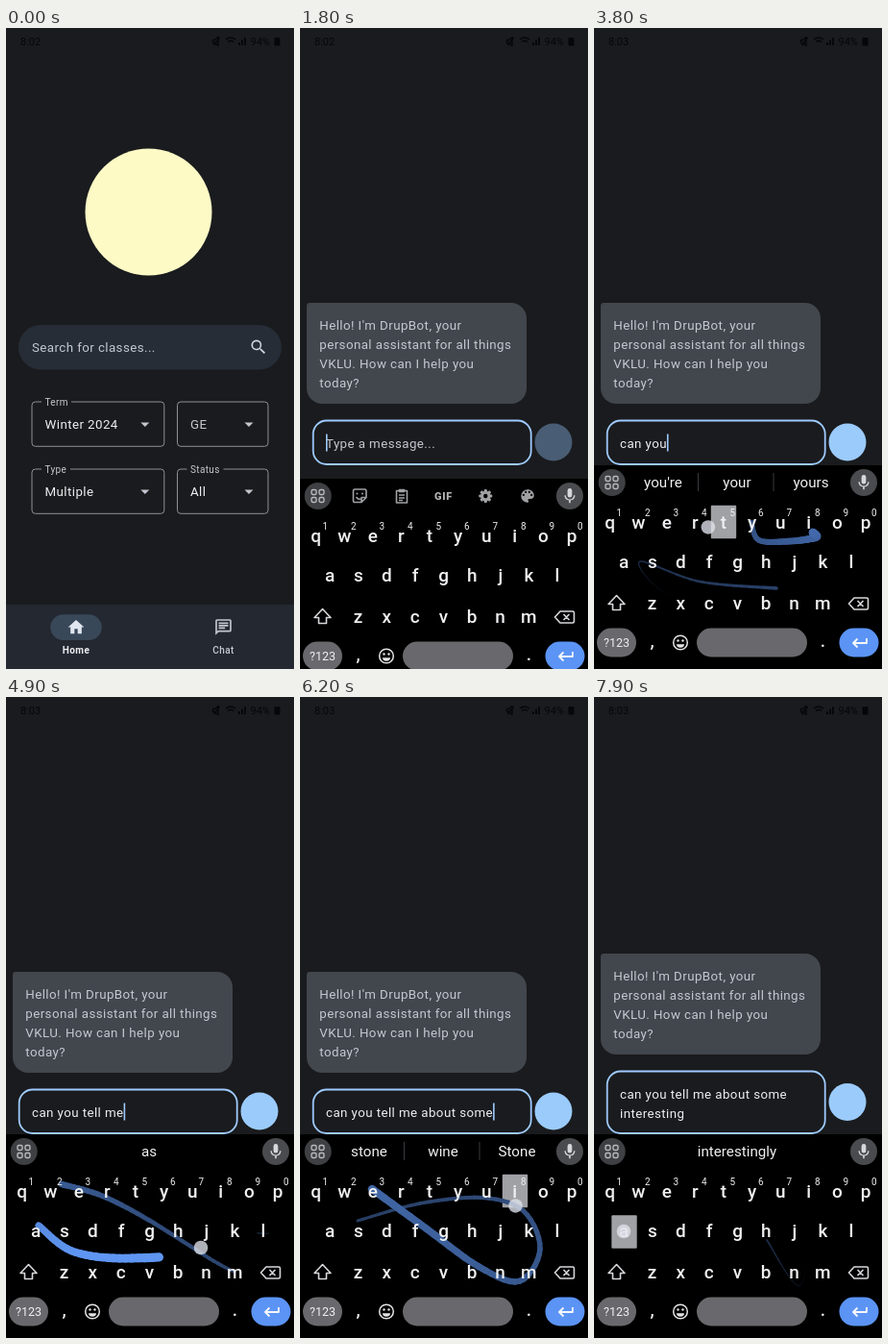
Write an HTML page that moves like this. It is 300 by 667 pixels and loops after 8000 ms.

```html
<!DOCTYPE html>
<html lang="en">
<head>
<meta charset="utf-8">
<title>Class search and chat</title>
<style>
  html, body { margin: 0; width: 100%; height: 100%; overflow: hidden; background: #1a1b1e; }
  svg { display: block; }
  text { font-family: Roboto, sans-serif; font-size: 13.33px; letter-spacing: .417px; fill: #c5c8d0; }
  .small { font-size: 10px; letter-spacing: .36px; }
  .strong { fill: #eeeef2; }
  .nav { font-size: 10px; font-weight: 500; text-anchor: middle; }
  .status text { font-size: 11px; letter-spacing: 0; fill: #060708; }
  .board text { fill: #f0f0f2; letter-spacing: 0; text-anchor: middle; }
  .board .key { font-size: 19px; font-weight: 500; }
  .board .digit { font-size: 10px; }
  .board .word { font-size: 15.2px; }
  .icon { fill-rule: evenodd; }
</style>
</head>
<body>
<svg id="stage" width="300" height="667" viewBox="0 0 300 667"></svg>
<script>
const LOOP = 8000, STEP = 100, TRAIL_LIFE = 850, TRAIL_LAG = 50;

const ICONS = {
  home: 'M10 20v-6h4v6h5v-8h3L12 3 2 12h3v8z',
  homeLine: 'M12 5.7l5 4.5V18h-2v-6H9v6H7v-7.8zM12 3L2 12h3v8h6v-6h2v6h6v-8h3z',
  chat: 'M20 2H4a2 2 0 00-2 2v18l4-4h14a2 2 0 002-2V4a2 2 0 00-2-2zM6 9h12v2H6zM6 12h8v2H6zM6 6h12v2H6z',
  chatLine: 'M4 4h16v12H5.2L4 17.2zM4 2a2 2 0 00-2 2v18l4-4h14a2 2 0 002-2V4a2 2 0 00-2-2zM6 12h8v2H6zM6 9h12v2H6zM6 6h12v2H6z',
  search: 'M15.5 14h-.8l-.3-.3A6.5 6.5 0 109.5 16c1.6 0 3.1-.6 4.2-1.6l.3.3v.8l5 5 1.5-1.5zM9.5 14a4.5 4.5 0 110-9 4.5 4.5 0 010 9z',
  mic: 'M12 14a3 3 0 003-3V5a3 3 0 00-6 0v6a3 3 0 003 3zM17.3 11a5.3 5.3 0 01-10.6 0H5a7 7 0 006 6.7V21h2v-3.3A7 7 0 0019 11z',
  palette: 'M12 3a9 9 0 000 18c.8 0 1.5-.7 1.5-1.5 0-.4-.1-.7-.4-1-.2-.3-.4-.6-.4-1 0-.8.7-1.5 1.5-1.5H16a5 5 0 005-5c0-4.4-4-8-9-8zM6.5 12a1.5 1.5 0 110-3 1.5 1.5 0 010 3zM9.5 8a1.5 1.5 0 110-3 1.5 1.5 0 010 3zM14.5 8a1.5 1.5 0 110-3 1.5 1.5 0 010 3zM17.5 12a1.5 1.5 0 110-3 1.5 1.5 0 010 3z'
};

const text = (x, y, str, cls = '', extra = '') => `<text x="${x}" y="${y}" class="${cls}" ${extra}>${str}</text>`;
const rect = (x, y, w, h, r, fill, extra = '') =>
  `<rect x="${x}" y="${y}" width="${w}" height="${h}" rx="${r}" fill="${fill}" ${extra}/>`;
const circle = (x, y, r, fill, extra = '') => `<circle cx="${x}" cy="${y}" r="${r}" fill="${fill}" ${extra}/>`;
const line = (d, color = '#d6d7da', width = 1.6) =>
  `<path d="${d}" fill="none" stroke="${color}" stroke-width="${width}" stroke-linejoin="round"/>`;
const icon = (name, x, y, size = 20, fill = '#d3d6de') =>
  `<path class="icon" d="${ICONS[name]}" fill="${fill}" transform="translate(${x - size / 2} ${y - size / 2}) scale(${size / 24})"/>`;

// Home page
function selectBox(x, y, w, value, label, labelWidth) {
  const notch = label
    ? rect(x + 10, y - 2, labelWidth, 4, 0, '#1a1b1e') + text(x + 13.5, y + 4, label, 'small') : '';
  const arrow = x + w - 20;
  return rect(x, y, w, 46.3, 3.5, 'none', 'stroke="#8b9198"') + notch +
    text(x + 13.5, y + 28.3, value, label ? 'strong' : '') +
    `<path d="M${arrow - 4.5} ${y + 21.5}h9l-4.5 4.5z" fill="#c3c6cf"/>`;
}

const homePage = circle(148.5, 191.5, 66, '#fdfac6') +
  rect(13, 309, 274, 46.5, 23.25, '#262d37') +
  text(27, 337, 'Search for classes...') + icon('search', 263, 332) +
  selectBox(27, 389, 137.8, 'Winter 2024', 'Term', 31) +
  selectBox(178.5, 389, 94.5, 'GE') +
  selectBox(27, 459, 137.8, 'Multiple', 'Type', 30) +
  selectBox(178.5, 459, 94.5, 'All', 'Status', 38);

// Chat page, laid out for the raised keyboard
const greeting = ["Hello! I'm DrupBot, your", 'personal assistant for all things', 'VKLU. How can I help you', 'today?'];
const chatPage = `<g id="bubble">
    <path d="M10 286H220a16 16 0 0 1 16 16V375a16 16 0 0 1-16 16H23a16 16 0 0 1-16-16V289a3 3 0 0 1 3-3z" fill="#42464d"/>
    ${greeting.map((s, i) => text(20.3, 313.5 + 20 * i, s)).join('')}
  </g>
  <rect id="field" x="13.7" width="227" rx="14" fill="none"/>
  <g id="typed"></g>
  <rect id="cursor" width="1.6" height="18" fill="#9ecaff"/>
  <circle id="send" cx="264" r="19.5"/>`;

// Keyboard
const rows = [['qwertyuiop', 16.6, 520.5], ['asdfghjkl', 31.2, 562], ['zxcvbnm', 60.6, 604.5]];
const letters = rows.map(([keys, x, y]) =>
  [...keys].map((k, i) => text(x + 29.6 * i, y, k, 'key')).join('')).join('');
const digits = [...'1234567890'].map((d, i) => text(26.3 + 29.5 * i, 507.5, d, 'digit')).join('');

const squares = [[14.5, 469], [22.5, 469], [14.5, 477], [22.5, 477]]
  .map(([x, y]) => rect(x - 2.5, y - 2.5, 5, 5, 1.4, 'none', 'stroke="#b9babd" stroke-width="1.4"')).join('');
const gearTeeth = [...Array(8)].map((_, i) =>
  rect(191.7, 466, 3.2, 4, 1, '#d6d7da', `transform="rotate(${45 * i} 193.3 473)"`)).join('');

const tools = '<g opacity=".75">' +
  line('M57 466h10.5a1.5 1.5 0 0 1 1.5 1.5v7l-5 5h-7a1.5 1.5 0 0 1-1.5-1.5v-10.5a1.5 1.5 0 0 1 1.5-1.5zM69 474.5h-5v5M58.5 474q2 3 4.5 2') +
  circle(59.5, 470.5, 1, '#d6d7da') + circle(65, 470.5, 1, '#d6d7da') +
  line('M100.5 467.5h11v12.5h-11zM103.5 466.5h5v2h-5zM103 472h6M103 475h6M103 477.5h4') +
  text(149.5, 477, 'GIF', '', 'style="font-size:11px;font-weight:900;letter-spacing:.8px"') +
  gearTeeth + circle(193.3, 473, 3.7, 'none', 'stroke="#d6d7da" stroke-width="3"') +
  icon('palette', 237, 473, 18, '#d6d7da') + '</g>';

const dividers = line('M108.5 463v19M187 463v19', '#3a3b3f', 1);

const bottomRow = rect(3, 624.5, 41, 30, 15, '#69696d') +
  text(23.5, 643.5, '?123', '', 'style="font-size:12.5px"') +
  text(60.5, 644, ',', 'key') + text(238.5, 644, '.', 'key') +
  circle(90, 639.5, 7.3, 'none', 'stroke="#e4e4e6" stroke-width="1.5"') +
  circle(87.5, 637.5, 1.2, '#e4e4e6') + circle(92.5, 637.5, 1.2, '#e4e4e6') +
  `<path d="M86 641.3h8a4 3.4 0 0 1-8 0z" fill="#e4e4e6"/>` +
  rect(107, 624.5, 115, 30, 15, '#69696d') +
  rect(255.5, 624.5, 41, 30, 15, '#5b94f5') +
  line('M284 635v5h-14M274.5 635.5l-4.5 4.5 4.5 4.5', '#f4f6fb', 1.8);

const keyboard = rect(0, 455, 300, 240, 0, '#000') +
  circle(18.7, 473, 14, '#3f4043') + squares +
  circle(281, 473, 14, '#4a4b4e') + icon('mic', 281, 473, 19, '#d6d7da') +
  '<g id="strip"></g><g id="press"></g><g id="trail" stroke-linecap="round"></g>' +
  letters + digits +
  line('M23.5 590.5l8.5 9h-4.5v6h-8v-6h-4.5z') +
  line('M271 593h13a1.5 1.5 0 0 1 1.5 1.5v9a1.5 1.5 0 0 1-1.5 1.5h-13l-5.5-6zM274.5 596l6 6M280.5 596l-6 6') +
  bottomRow + '<g id="dot"></g>';

const statusBar = `<g class="status"><text id="clock" x="15" y="18"></text>
  ${line('M215.5 12.5h2l3.5-3v9l-3.5-3h-2zM222.5 10l-6 8', '#060708', 1.4)}
  ${line('M229 12q5-4 10 0M231 14.5q3-2.5 6 0M234 17h.1', '#060708', 1.5)}
  <path d="M242 18h2v-3h-2zM245 18h2v-5.5h-2zM248 18h2v-8h-2z" fill="#060708"/>
  ${text(254.5, 18, '94%')}${rect(279.5, 10, 6, 8.5, 1, '#060708')}</g>`;

document.getElementById('stage').innerHTML =
  rect(0, 0, 300, 667, 0, '#1a1b1e') + statusBar +
  `<g id="home">${homePage}</g><g id="chat">${chatPage}</g>
   <g>${rect(0, 600, 300, 67, 0, '#232831')}<g id="nav"></g></g>
   <g id="board" class="board">${keyboard}</g>`;

const $ = Object.fromEntries([...document.querySelectorAll('[id]')].map(el => [el.id, el]));
const set = (el, attrs) => Object.entries(attrs).forEach(([k, v]) => el.setAttribute(k, v));

// Each swipe: start, end and the points the finger passes
const swipes = [
  [2900, 3250, [[120, 598], [70, 585], [48, 555], [110, 576], [190, 583]]],
  [3350, 3700, [[164, 514], [172, 533], [205, 534], [231, 530], [228, 525]]],
  [3730, 4170, [[135, 514], [113, 520], [75, 514], [170, 525], [268, 555], [262, 558]]],
  [4300, 4600, [[238, 598], [215, 586], [150, 545], [100, 519], [58, 507]]],
  [4650, 5150, [[34, 550], [70, 577], [130, 584], [203, 573], [253, 520], [194, 512], [135, 514]]],
  [5600, 6050, [[60, 545], [125, 527], [190, 521], [233, 535], [250, 575], [228, 608], [185, 592], [130, 552], [75, 512]]],
  [6190, 7200, [[225, 525], [212, 590], [135, 514], [75, 514], [104, 514], [75, 514], [60, 555], [135, 514], [223, 525], [215, 612], [180, 565]]],
  [7850, 8050, [[31, 556], [31, 556]]]
];
const pressed = [[120, 598], [164, 514], [135, 514], [238, 598], [31.5, 556.5], [60, 556.5], [224, 514], [31.5, 556.5]];

const strips = [[0, ''], [3000, 'can'], [3300, "can't|van|Can"], [3500, 'you'], [3700, "you're|your|yours"],
  [4000, 'tell'], [4300, 'tells|Tell|tel'], [4500, 'me'], [4700, 'my|Me|mr'], [4800, 'as'], [5000, 'about'],
  [5400, 'abort|About|abbot'], [5800, 'some'], [6100, 'stone|wine|Stone'], [6500, 'inter'],
  [6900, 'interest'], [7300, 'interestingly']];
const commits = [[1500, ''], [3300, 'can'], [3700, 'can you'], [4300, 'can you tell'], [4700, 'can you tell me'],
  [5400, 'can you tell me about'], [6100, 'can you tell me about some'], [7300, 'can you tell me about some|interesting']];

const latest = (table, t) => table.filter(([at]) => at <= t).pop();
const clamp = v => Math.min(1, Math.max(0, v));
const smooth = v => { v = clamp(v); return v < .4 ? 2.2 * v * v : 1 - (1 - v) ** 3 * 3; };

// Catmull-Rom curve through the points
function along(points, f) {
  const s = clamp(f) * (points.length - 1), i = Math.min(Math.floor(s), points.length - 2), u = s - i;
  const at = k => points[Math.min(points.length - 1, Math.max(0, k))];
  const [a, b, c, d] = [at(i - 1), at(i), at(i + 1), at(i + 2)];
  return [0, 1].map(n => b[n] + .5 * u * (c[n] - a[n] +
    u * (2 * a[n] - 5 * b[n] + 4 * c[n] - d[n] + u * (3 * (b[n] - c[n]) + d[n] - a[n]))));
}

// The trail thins with age and dims once the finger lifts
function drawTrail([start, end, points], t) {
  if (t - start < 120 || t - end > TRAIL_LIFE) return '';
  let out = '';
  const last = Math.min(end, t - TRAIL_LAG), glow = t > end ? .75 : 1.1;
  for (let m = Math.max(start, t - TRAIL_LIFE); m < last; m += 8) {
    const fresh = clamp(1 - (t - m) / TRAIL_LIFE);
    const [x1, y1] = along(points, (m - start) / (end - start));
    const [x2, y2] = along(points, (Math.min(m + 8, last) - start) / (end - start));
    const color = [95, 150, 243].map(c => Math.round(c * Math.min(1, glow * Math.sqrt(fresh))));
    out += `<path d="M${x1} ${y1}L${x2} ${y2}" stroke="rgb(${color})" stroke-width="${10 * fresh}"/>`;
  }
  return out;
}

function drawNav(t) {
  const onChat = t >= 600;
  const tab = (x, name, label, active, grow) =>
    (active ? rect(x - 26.7 * grow, 610.3, 53.4 * grow, 26.7, 13.3, '#394858') : '') +
    icon(active ? name : name + 'Line', x, 623.5, 20, active ? '#e0e6ef' : '#c3c6cf') +
    text(x, 651, label, 'nav ' + (active ? 'strong' : ''), active ? 'style="font-weight:700"' : '');
  return tab(73, 'home', 'Home', !onChat, 1) + tab(226.5, 'chat', 'Chat', onChat, clamp((t - 500) / 300));
}

function drawStrip(t) {
  const words = latest(strips, t)[1].split('|');
  if (!words[0]) return tools;
  return words.length === 1 ? text(149, 478, words[0], 'word')
    : dividers + words.map((w, i) => text(72 + 77 * i, 478, w, 'word')).join('');
}

function drawChat(t) {
  const rise = t < 1500 ? 0 : [0, .45, .88][Math.floor((t - 1500) / STEP)] ?? 1;
  const focused = t >= 1500;
  const [editedAt, value] = latest(commits, t) || [0, ''];
  const lines = value.split('|'), extra = 19 * (lines.length - 1);
  set($.chat, { opacity: smooth((t - 520) / 700), transform: `translate(0 ${132 * (1 - rise)})` });
  set($.bubble, { transform: `translate(0 ${-extra})` });
  set($.field, { y: 408.5 - extra, height: 45.5 + extra,
    stroke: focused ? '#9ecaff' : '#8b9198', 'stroke-width': focused ? 1.8 : 1 });
  set($.send, { cy: 431 - extra / 2, fill: value ? '#9bcbfb' : '#495d74' });
  $.typed.innerHTML = value
    ? lines.map((s, i) => text(27, 436.5 - extra + 20 * i, s, 'strong')).join('')
    : text(27, 436.5, 'Type a message...');
  const width = value ? $.typed.lastElementChild.getComputedTextLength() : 0;
  const blink = value ? (t - editedAt) % 1000 < 500 : t < 2400 || t >= 2600;
  set($.cursor, { x: 27 + width, y: 422.5 + (extra ? 1 : 0), opacity: focused && blink ? 1 : 0 });
}

function drawKeyboard(t) {
  const drop = t < 1500 ? 240 : [190, 110, 45, 14, 4, 1][Math.floor((t - 1500) / STEP)] ?? 0;
  set($.board, { transform: `translate(0 ${drop})` });
  $.strip.innerHTML = drawStrip(t);
  $.trail.innerHTML = swipes.map(s => drawTrail(s, t)).join('');
  const active = swipes.findIndex(([start, end]) => t >= start && t <= end);
  $.press.innerHTML = $.dot.innerHTML = '';
  if (active < 0) return;
  const [start, end, points] = swipes[active];
  const [x, y] = along(points, (t - start) / (end - start));
  $.dot.innerHTML = circle(x, y, 7.3, '#dfe3ea', 'opacity=".78"');
  if (t - start < 120) {
    const [kx, ky] = pressed[active];
    $.press.innerHTML = rect(kx - 13.2, ky - 17.2, 26.4, 34.4, 1, '#a0a1a5');
  }
}

function render(t) {
  $.clock.textContent = t < 2400 ? '8:02' : '8:03';
  set($.home, { opacity: 1 - smooth((t - 520) / 600) });
  $.nav.innerHTML = drawNav(t);
  drawChat(t);
  drawKeyboard(t);
}

let shown = -1;
const began = performance.now();
function tick() {
  const t = Math.floor(((performance.now() - began) % LOOP) / STEP) * STEP;
  if (t !== shown) render(shown = t);
  requestAnimationFrame(tick);
}
tick();
</script>
</body>
</html>
```
